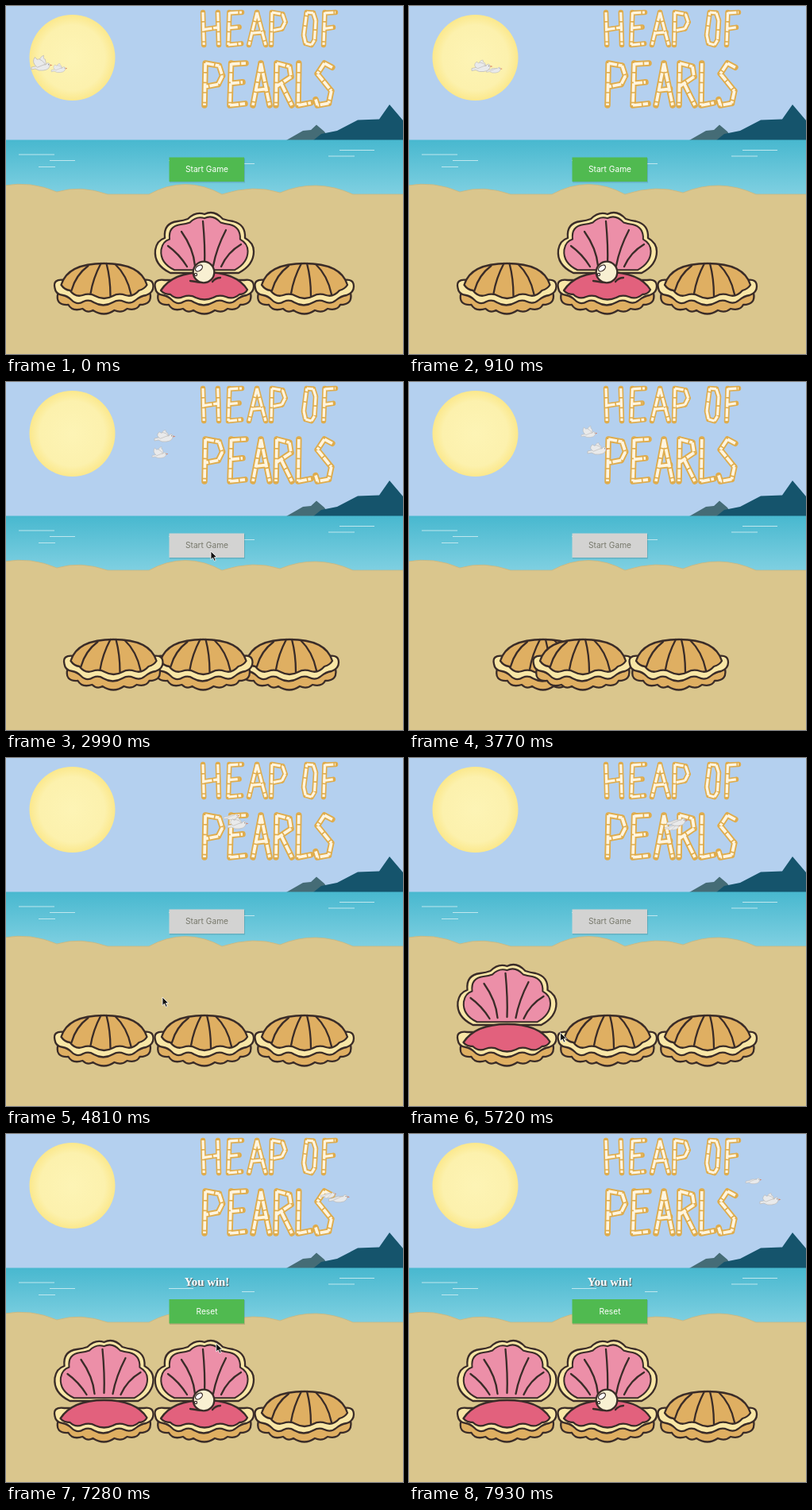
Animation of 500x438 px, one loop 8.06 s. Source, as an HTML page:

```html
<!DOCTYPE html>
<html lang="en">
<head>
<meta charset="utf-8">
<title>Heap of Pearls</title>
<style>
  html, body { margin: 0; width: 100%; height: 100%; overflow: hidden; background: #b4d0ef; }
  svg { display: block; width: 500px; height: 438px; }
  .ink { stroke: #3a2c28; stroke-width: 2.3; stroke-linejoin: round; stroke-linecap: round; }
  .line { fill: none; }
  .gold { fill: #dfaf62; }
  .cream { fill: #f8e6a6; }
  .pink { fill: #ec8fa8; }
  .rose { fill: #e2617d; }
  .bird { fill: #e9eaeb; stroke: #bbb8b5; stroke-width: .7; stroke-linejoin: round; }
  .label { font: 10.2px Inter, Roboto, sans-serif; text-anchor: middle; }
  .win { font: bold 14.8px "Liberation Serif", "Times New Roman", serif; text-anchor: middle; fill: #fff; }
</style>
</head>
<body>
<svg viewBox="0 0 500 438">
  <defs>
    <radialGradient id="sunFill">
      <stop offset="0" stop-color="#fdf4b5"/><stop offset=".76" stop-color="#fcf1ad"/><stop offset="1" stop-color="#fbe88c"/>
    </radialGradient>
    <linearGradient id="seaFill" x2="0" y2="1">
      <stop offset="0" stop-color="#48b8cf"/><stop offset="1" stop-color="#84d2e3"/>
    </linearGradient>
    <g id="base">
      <path class="ink gold" d="M-58 6Q-62 22-45 21Q-40 30-27 26Q-21 32-14 28Q0 37 13 28Q22 32 29 26Q41 29 45 21Q61 21 58 6Z"/>
      <path class="ink cream" d="M-50-10Q-65-12-62 0Q-61 8-52 9Q-46 10-41 15Q-34 22-26 17Q-19 14-13 18Q-1 25 11 18Q18 14 25 17Q33 21 40 15Q46 10 53 9Q62 6 62-2Q62-12 50-10Z"/>
    </g>
    <g id="closed">
      <use href="#base"/>
      <path class="ink gold" d="M-54-4Q-46-31 0-31Q46-31 54-4Q51 1 44 3Q36 12 27 9Q18 6 11 10Q0 16-11 10Q-18 6-27 9Q-36 12-43 3Q-50 2-54-4Z"/>
      <path class="ink line" d="M-20-28Q-36-16-41 3M-4-31Q-14-12-17 7M3-31Q8-12 8 10M14-30Q29-16 34 8"/>
    </g>
    <path id="fan" d="M-43-19Q-64-29-62-48Q-60-60-50-63Q-52-82-34-84Q-26-85-21-87Q-11-97 0-93Q12-99 23-87Q29-85 36-84Q52-80 51-63Q62-57 62-46Q62-29 43-19Z"/>
    <g id="open">
      <use href="#fan" class="ink cream"/>
      <use href="#fan" class="ink pink" transform="translate(0 -6) scale(.88)"/>
      <path class="ink line" stroke-width="1.8" d="M-22-27Q-32-43-46-53M-12-28Q-14-50-29-71M0-29Q1-52-2-84M11-28Q15-50 27-73M21-27Q29-45 46-55"/>
      <use href="#base"/>
      <path class="ink rose" d="M-55 3Q-40-20 0-20Q40-20 54 2Q51 8 44 8Q36 15 27 11Q18 8 11 12Q0 17-11 12Q-18 8-27 11Q-36 15-43 8Q-51 8-55 3Z"/>
    </g>
    <g id="pearl">
      <path class="ink line" d="M-18-9Q-10-8-6-7M10-8Q14-13 20-13"/>
      <circle class="ink" cx="-1" cy="-20" r="13.3" fill="#f8f0d2"/>
      <ellipse class="ink" cx="-7" cy="-25" rx="5" ry="3.2" fill="#fff" transform="rotate(-38 -7 -25)" style="stroke-width:1.3"/>
      <circle class="ink" cx="-11" cy="-17" r="1.6" fill="#fff" style="stroke-width:1.2"/>
    </g>
    <path id="wing" d="M-6 0Q-11-9-4-13Q-3-8 0-9Q3-6 5 0Z"/>
  </defs>

  <rect width="500" height="170" fill="#b4d0ef"/>
  <circle cx="83.5" cy="65" r="54" fill="url(#sunFill)"/>
  <path fill="#456c76" d="M353 169L374 157L384 156L391 149.500L401 158L408 169Z"/>
  <path fill="#15546c" d="M387 169L397 161L417 157L443 143.500L470 142.500L483 124L500 144V169Z"/>
  <rect y="168.500" width="500" height="75" fill="url(#seaFill)"/>
  <path stroke="#bfe7ee" fill="none" d="M16 187H61M55 194.500H87M41 202.500H62M205 194.500H236M297 198.500H313M420 181.500H464M406 189H439"/>
  <path fill="#dac68d" stroke="#c8b681" stroke-width=".8" d="M-2 226Q32 220 64 234Q94 225 128 237H180Q226 212 272 237Q312 224 345 235Q391 216 437 237H502V440H-2Z"/>

  <g id="title" role="img" aria-label="HEAP OF PEARLS" fill="none" stroke-linecap="round" stroke-linejoin="round"></g>
  <g id="birds"></g>

  <text id="win" class="win" x="253" y="191" style="text-shadow:1px 1px 1px #555">You win!</text>
  <g id="button">
    <rect x="206" y="191.500" width="95" height="31" fill="#000" opacity=".13"/>
    <rect id="face" x="205.500" y="190.500" width="94.500" height="30.500"/>
    <text id="label" class="label" x="253" y="209.300"></text>
  </g>
  <g id="shells"></g>
  <path id="cursor" fill="#111" stroke="#fff" stroke-width=".8" d="M0 0V10.500L2.500 8.300L4.300 12.300L6.200 11.500L4.400 7.600H7.700Z"/>
</svg>
<script>
const STEP = 130, LOOP = 8060;
const START = 1170, FIRST_PICK = 5330, WIN = 6110;
const L = 123.5, M = 250, R = 376;
const $ = id => document.getElementById(id);

// Letter strokes in a unit box
const glyphs = {
  H: ['0 0 .06 1', '.94 0 1 1', '.03 .53 .97 .46'],
  E: ['.08 0 0 1', '.08 .02 1 0', '.05 .48 .8 .45', '0 1 .95 .96'],
  A: ['.48 0 0 1', '.48 0 1 1', '.2 .64 .84 .61'],
  P: ['.05 0 0 1', '.05 0 .8 .06', '.8 .06 .98 .3', '.98 .3 .75 .5', '.75 .5 .04 .56'],
  O: ['.25 0 .8 .02', '.8 .02 1 .25', '1 .25 .9 .85', '.9 .85 .65 1', '.65 1 .15 .95', '.15 .95 0 .7', '0 .7 .25 0'],
  F: ['.1 0 0 1', '.1 .02 1 0', '.06 .5 .8 .46'],
  R: ['.05 0 0 1', '.05 0 .85 .08', '.85 .08 .95 .32', '.95 .32 .04 .55', '.35 .5 1 1'],
  L: ['.05 0 0 1', '0 1 1 .94'],
  S: ['.95 .1 .5 0', '.5 0 .1 .25', '.1 .25 .9 .66', '.9 .66 .75 .95', '.75 .95 .1 1', '.1 1 0 .86']
};

function write(word, xs, widths, y, h, weight) {
  let d = '';
  [...word].forEach((ch, i) => glyphs[ch].forEach(s => {
    const [a, b, c, e] = s.split(' ').map(Number);
    d += `M${xs[i] + a * widths[i]} ${y + b * h}L${xs[i] + c * widths[i]} ${y + e * h}`;
  }));
  return `<path d="${d}" stroke="#dfac4c" stroke-width="${weight}"/>` +
    `<path d="${d}" stroke="#fff5df" stroke-width="${weight * .5}" stroke-linecap="butt" stroke-dasharray="11 1.6"/>`;
}
$('title').innerHTML =
  write('HEAPOF', [248, 280, 306, 334, 375, 400], [20, 17, 21, 18, 15, 15], 8, 41, 6.5) +
  write('PEARLS', [250, 282, 311, 340, 368, 390], [23, 20, 21, 20, 16, 22], 72, 53, 7.5);

// Back to front; the last one hides the pearl
const shells = [
  { path: [[2080, R], [2860, R], [2990, 357], [3510, L], [3770, 169], [4290, R]], isOpen: () => false },
  { path: [[2080, L], [2860, M], [2990, 248.5], [3510, M], [3770, 219], [4290, L]], isOpen: t => t >= FIRST_PICK },
  { path: [[2080, M], [2860, L], [2990, 135.5], [3510, R], [3770, 340], [4290, M]], isOpen: t => t < START || t >= WIN, pearl: true }
];
$('shells').innerHTML = shells.map(s =>
  `<g><use href="#closed"/><g><use href="#open"/>${s.pearl ? '<use href="#pearl"/>' : ''}</g></g>`).join('');

const birds = [
  { size: .76, phase: 1, path: [[0, 67, 79], [1820, 148, 80], [2990, 194, 91], [3770, 227, 65], [4810, 284, 73], [6500, 373, 97], [7930, 434, 58]] },
  { size: 1, phase: 0, path: [[0, 45, 75], [1820, 139, 78], [2990, 200, 69], [3770, 238, 85], [4810, 292, 83], [6500, 377, 76], [7930, 455, 83]] }
];
$('birds').innerHTML = birds.map(() => `<g class="bird">
  <use href="#wing" x="2"/>
  <path d="M-13 2L-8 1Q-1-3 5-1Q7-5 10-2Q11 5 2 6Q-4 7-8 4L-13 5Z"/>
  <use href="#wing"/>
  <circle cx="8.500" cy="-1.300" r=".5" fill="#555" stroke="none"/>
  <path d="M10.500-1.500L13.500-.5L10.500 .5Z" fill="#d98263" stroke="none"/></g>`).join('');

const pointer = [[1170, 258, 213], [3120, 258, 213], [4420, 222, 283], [4810, 197, 301], [5200, 142, 344],
  [5590, 142, 344], [5980, 288, 349], [6890, 288, 349], [7410, 257, 235]];

function at(path, t) {
  if (t <= path[0][0]) return path[0].slice(1);
  const i = path.findIndex(p => p[0] > t);
  if (i < 0) return path[path.length - 1].slice(1);
  const a = path[i - 1], b = path[i], k = (t - a[0]) / (b[0] - a[0]);
  return a.slice(1).map((v, j) => v + (b[j + 1] - v) * k);
}
const show = (el, on) => el.style.display = on ? '' : 'none';
const place = (el, x, y, extra = '') => el.setAttribute('transform', `translate(${x} ${y}) ${extra}`);

function draw(t) {
  shells.forEach((s, i) => {
    const el = $('shells').children[i], open = s.isOpen(t);
    place(el, at(s.path, t)[0], 355);
    show(el.children[0], !open);
    show(el.children[1], open);
  });
  birds.forEach((b, i) => {
    const el = $('birds').children[i], flap = .3 + .7 * Math.cos(t / 390 * Math.PI + b.phase);
    place(el, ...at(b.path, t), `scale(${b.size})`);
    el.children[0].setAttribute('transform', `rotate(18) scale(.8 ${flap})`);
    el.children[2].setAttribute('transform', `rotate(-22) scale(1 ${flap})`);
  });
  const won = t >= WIN, idle = t >= START && !won;
  show($('win'), won);
  place($('button'), 0, won ? 17.5 : 0);
  $('face').setAttribute('fill', idle ? '#d3d3d2' : '#50ba50');
  $('label').setAttribute('fill', idle ? '#77786b' : '#fff');
  $('label').textContent = won ? 'Reset' : 'Start Game';
  place($('cursor'), ...at(pointer, t));
  show($('cursor'), t >= START && t < 3250 || t >= 4420 && t < 7410);
}

const begin = performance.now();
function tick() {
  const t = Math.max(0, performance.now() - begin) % LOOP;
  draw(Math.floor(t / STEP) * STEP);
  requestAnimationFrame(tick);
}
tick();
</script>
</body>
</html>
```
